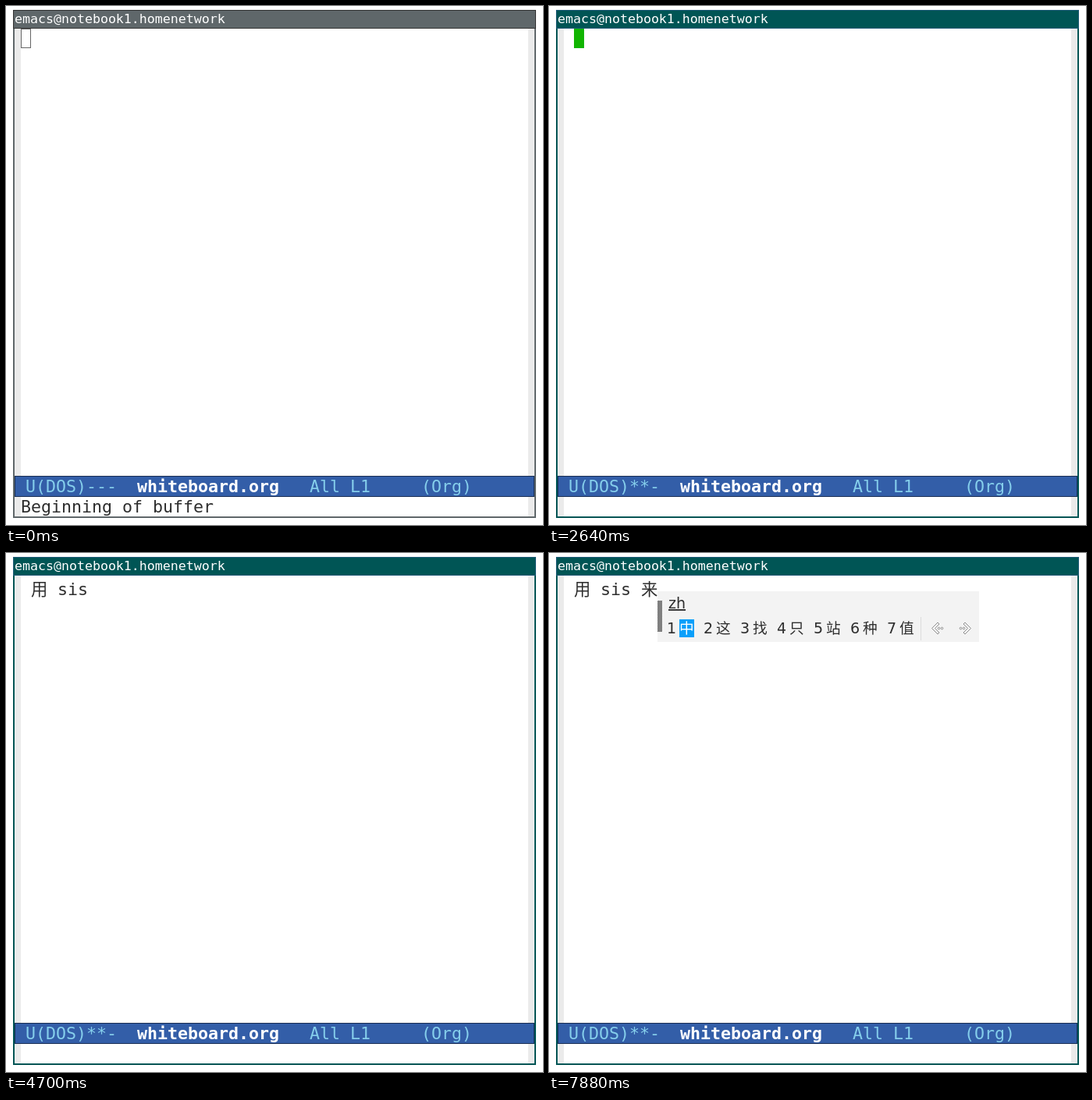
Recreate the animation shown at these times as an HTML page. Size 688 by 665 pixels, loop 8 s.

```html
<!DOCTYPE html>
<html lang="zh-CN">
<head>
<meta charset="utf-8">
<title>Typing in an editor</title>
<style>
  html, body { margin: 0; width: 100%; height: 100%; overflow: hidden; background: #fff; }
  svg { display: block; width: 688px; height: 665px; }
  text { white-space: pre; fill: #2e2e2e; }
  .mono { font: 21.6px "DejaVu Sans Mono", monospace; }
  .title { font: 16.6px "DejaVu Sans Mono", monospace; fill: #fff; }
  .cjk { font: 500 21.3px "Noto Sans CJK SC", "Noto Sans CJK", sans-serif; }
  .mode { fill: #85ceeb; }
  .bold { font-weight: bold; fill: #fff; }
  .pop { font: 19px "DejaVu Sans", sans-serif; }
  .cand { font: 18.7px "Noto Sans CJK SC", "Noto Sans CJK", sans-serif; }
  .arrow { fill: #f8f8f8; stroke: #8c8c8c; stroke-width: 1; }
</style>
</head>
<body>
<svg viewBox="0 0 688 665">
  <defs>
    <pattern id="grip" width="2" height="2" patternUnits="userSpaceOnUse">
      <rect width="2" height="2" fill="#999"/>
      <path d="M0 0h1v1h-1zM1 1h1v1h-1z" fill="#666"/>
    </pattern>
    <g id="chevron" class="arrow">
      <path d="M8 -7.5L.5 0L8 7.5L10 5.5L4.5 0L10 -5.5Z"/>
      <circle cx="9.5" cy="0" r="1.3"/>
      <circle cx="13.5" cy="0" r="1.3"/>
    </g>
  </defs>
  <rect id="frame" x="9" y="5" width="670" height="651"/>
  <rect id="bar" x="9.5" y="5.5" width="669" height="23"/>
  <text class="title" x="11" y="22">emacs@notebook1.homenetwork</text>
  <rect x="11" y="29" width="666" height="625" fill="#ebebeb"/>
  <rect x="19" y="29" width="650" height="625" fill="#fff"/>
  <rect x="11.5" y="602.5" width="665" height="26" fill="#335ea8" stroke="#1a2f54"/>
  <text id="flags" class="mono mode" x="25" y="623"></text>
  <text class="mono bold" x="168" y="623">whiteboard.org</text>
  <text class="mono mode" x="389" y="623">All L1</text>
  <text class="mono mode" x="532" y="623">(Org)</text>
  <text id="echo" class="mono" x="19" y="649"></text>
  <rect id="cursor"/>
  <text id="word1" class="cjk" x="32" y="54">用</text>
  <text id="word2" class="mono" x="66" y="54"></text>
  <text id="word3" class="cjk" x="118" y="54">来</text>
  <g id="popup">
    <rect y="49" width="412" height="65" fill="#f3f3f3"/>
    <rect y="61" width="6" height="40" fill="url(#grip)"/>
    <text id="preedit" class="pop" x="14" y="71" text-decoration="underline"></text>
    <rect x="28" y="85" width="19" height="23" fill="#0a9ffa"/>
    <g id="list"></g>
    <path d="M337.5 82V112" stroke="#dcdcdc"/>
    <use href="#chevron" x="351" y="96.5"/>
    <use href="#chevron" transform="translate(402 96.5) scale(-1 1)"/>
  </g>
</svg>
<script>
const LOOP = 8000;
const $ = id => document.getElementById(id);
const set = (el, attrs) => { for (const k in attrs) el.setAttribute(k, attrs[k]); };

// Each track lists [start time, ...values]; a value holds until the next entry.
const cursorTrack = [
  [0, 19, "hollow"], [90, 19, "dark"], [510, 19, ""],
  [1010, 32, "green"], [1820, 32, ""], [2280, 32, "green"],
  [2690, 53, "green"], [3150, 53, ""], [3210, 66, "green"],
  [3370, 79, "green"], [3450, 92, "green"], [3600, 105, "green"],
  [3900, 118, "green"], [4700, 118, ""], [5200, 118, "green"], [5700, 118, ""],
  [6210, 118, "green"], [6430, 139, "green"], [6890, 139, ""],
  [7390, 139, "green"], [7880, 139, ""]
];
const echoTrack = [
  [0, "Beginning of buffer"], [1010, ""],
  [3810, 'Starting "look" process...'], [3850, ""]
];
const flagTrack = [[0, "---"], [1010, "**-"], [6210, "---"], [6430, "**-"]];
const latinTrack = [[0, ""], [3370, "s"], [3450, "si"], [3600, "sis"]];
const popupTrack = [
  [0, 0, ""],
  [1960, 32, "y", "一有也要用以与"],
  [2180, 32, "yo", "有用又由哟友右"],
  [2230, 32, "yon", "用永勇拥涌泳庸"],
  [2280, 32, "yong", "用永勇拥涌泳庸"],
  [2640, 0, ""],
  [5650, 74, "l", "了来里老两啦路"],
  [5700, 118, "l", "了来里老两啦路"],
  [6000, 118, "la", "啦拉来辣蜡喇落"],
  [6040, 118, "lai", "来赖莱睐籁徕濑"],
  [6390, 0, ""],
  [7600, 118, "zh", "中这找只站种值"],
  [7650, 139, "zh", "中这找只站种值"]
];
const at = (track, t) => track.findLast(step => step[0] <= t).slice(1);
const show = (el, on) => set(el, { visibility: on ? "visible" : "hidden" });

function addText(cls, x) {
  const el = document.createElementNS("http://www.w3.org/2000/svg", "text");
  set(el, { class: cls, x, y: 103 });
  return $("list").appendChild(el);
}
const candidates = Array.from({ length: 7 }, (_, i) => {
  addText("pop", 12 + 47 * i).textContent = i + 1;
  const el = addText("cand", 28 + 47 * i);
  if (i === 0) el.style.fill = "#fff";
  return el;
});

function drawCursor(t) {
  const [x, look] = at(cursorTrack, t);
  const inset = look === "hollow" ? 0.5 : 0;
  const height = t < 2690 ? 25 : 32;
  set($("cursor"), {
    x: x + inset, y: 29 + inset, width: 13 - 2 * inset, height: height - 2 * inset,
    fill: { green: "#11b500", dark: "#333" }[look] || "none",
    stroke: inset ? "#666" : "none"
  });
}

function drawPopup(t) {
  const [x, typed, chars] = at(popupTrack, t);
  show($("popup"), typed);
  if (!typed) return;
  set($("popup"), { transform: `translate(${x} 0)` });
  $("preedit").textContent = typed;
  candidates.forEach((el, i) => { el.textContent = chars[i]; });
}

function draw(t) {
  const focused = t >= 40;
  const tint = focused ? "#005555" : "#5f676a";
  set($("frame"), { fill: tint });
  set($("bar"), { fill: tint, stroke: focused ? "#1f5b78" : "#333" });
  $("flags").textContent = "U(DOS)" + at(flagTrack, t)[0];
  $("echo").textContent = at(echoTrack, t)[0];
  $("word2").textContent = at(latinTrack, t)[0];
  show($("word1"), t >= 2690);
  show($("word3"), t >= 6430);
  drawCursor(t);
  drawPopup(t);
}

const start = performance.now();
function tick() {
  draw((performance.now() - start) % LOOP);
  requestAnimationFrame(tick);
}
tick();
</script>
</body>
</html>
```
